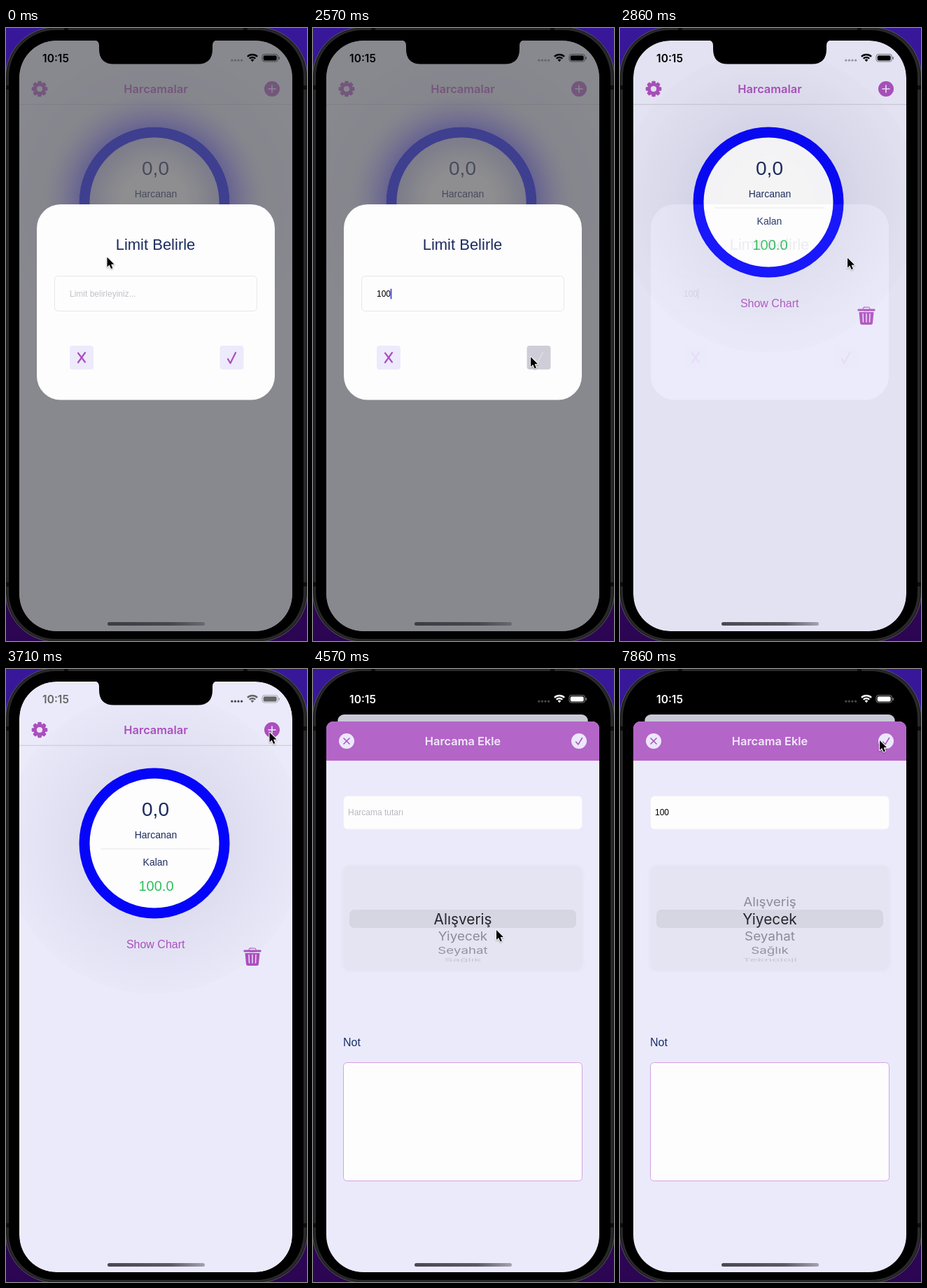
An HTML page with a canvas that plays this animation: 430 px wide and 876 px high, repeating every 8 s.

```html
<!DOCTYPE html>
<html lang="tr">
<head>
<meta charset="utf-8">
<title>Harcamalar</title>
<style>
html, body { margin: 0; width: 100%; height: 100%; overflow: hidden; background: #000; }
canvas { display: block; width: 430px; height: 876px; }
</style>
</head>
<body>
<canvas id="stage"></canvas>
<script>
const W = 430, H = 876, LOOP = 8000, FPS = 7;
const canvas = document.getElementById('stage');
const ratio = window.devicePixelRatio || 1;
canvas.width = W * ratio;
canvas.height = H * ratio;
const c = canvas.getContext('2d');

const SANS = '"Liberation Sans", Arial, sans-serif';
const UI = 'Inter, Roboto, sans-serif';
const PURPLE = '#ab4fbd', NAVY = '#1c2b5e', PAPER = '#fdfdfe', LILAC = '#ebeafb';
const SCREEN = { x: 19, y: 18, w: 390, h: 844 };

const clamp = v => Math.max(0, Math.min(1, v));
const mix = (a, b, p) => a + (b - a) * p;

// [step, x, y] of the pointer tip
const POINTER = [
  [0, 144.5, 327.5], [5, 165, 376], [13, 165, 376], [17, 311, 470], [18, 311, 470],
  [20, 325, 328.5], [24, 376.5, 90.5], [28, 376.5, 90.5], [32, 262, 373], [33, 262, 373],
  [36, 262, 350], [37, 262, 350], [42, 266, 216], [50, 266, 216], [55, 371, 102]
];

function pointerAt(n) {
  let i = 1;
  while (i < POINTER.length - 1 && POINTER[i][0] < n) i++;
  const [n0, x0, y0] = POINTER[i - 1], [n1, x1, y1] = POINTER[i];
  let p = clamp((n - n0) / (n1 - n0));
  p = p * p * (3 - 2 * p);
  return [mix(x0, x1, p), mix(y0, y1, p)];
}

function box(x, y, w, h, r, fill, stroke) {
  c.beginPath();
  c.roundRect(x, y, w, h, r);
  if (fill) { c.fillStyle = fill; c.fill(); }
  if (stroke) { c.strokeStyle = stroke; c.lineWidth = 1; c.stroke(); }
}

function disc(x, y, r, fill) {
  c.beginPath();
  c.arc(x, y, r, 0, Math.PI * 2);
  c.fillStyle = fill;
  c.fill();
}

function line(points, color, width) {
  c.beginPath();
  points.forEach(([x, y], i) => i ? c.lineTo(x, y) : c.moveTo(x, y));
  c.strokeStyle = color;
  c.lineWidth = width;
  c.lineCap = c.lineJoin = 'round';
  c.stroke();
}

function text(str, x, y, font, color, align = 'center') {
  c.font = font;
  c.fillStyle = color;
  c.textAlign = align;
  c.fillText(str, x, y);
}

function group(draw) {
  c.save();
  draw();
  c.restore();
}

function radial(x, y, r0, r1, from, to) {
  const g = c.createRadialGradient(x, y, r0, x, y, r1);
  g.addColorStop(0, from);
  g.addColorStop(1, to);
  return g;
}

function phone() {
  const g = c.createLinearGradient(0, 0, 0, H);
  g.addColorStop(0, '#38189a');
  g.addColorStop(0.5, '#2a1070');
  g.addColorStop(1, '#2c0552');
  c.fillStyle = g;
  c.fillRect(0, 0, W, H);
  box(-0.5, -1, 431, 878, 71, '#1c1c1e', '#57575b');
  box(1.5, 0.5, 427, 875, 69, '#29292b');
  c.fillStyle = '#0d0d0e';
  for (const y of [82, 792]) {
    c.fillRect(0, y, 5, 6);
    c.fillRect(425, y, 5, 6);
  }
  c.fillRect(83, 0, 6, 4);
  c.fillRect(339, 0, 6, 4);
  box(4, 3, 421, 870, 67, '#000');
}

function notch() {
  c.beginPath();
  c.moveTo(126, 17);
  c.quadraticCurveTo(133, 18, 133, 25);
  c.lineTo(133, 30);
  c.quadraticCurveTo(133, 51.5, 154, 51.5);
  c.lineTo(274, 51.5);
  c.quadraticCurveTo(295, 51.5, 295, 30);
  c.lineTo(295, 25);
  c.quadraticCurveTo(295, 18, 302, 17);
  c.closePath();
  c.fillStyle = '#000';
  c.fill();
}

function statusBar(level) {
  const v = Math.round(255 * level), ink = `rgb(${v},${v},${v})`;
  text('10:15', 71, 48.5, `600 15.5px ${UI}`, ink);
  const dots = level > 0.3 ? '#48484b' : 'rgba(60,58,70,.45)';
  for (let i = 0; i < 4; i++) disc(322.8 + i * 4.6, 46.2, 1.6, dots);
  const a = -Math.PI * 0.75, b = -Math.PI * 0.25;
  for (const r of [6, 10]) {
    c.beginPath();
    c.arc(352, 48, r, a, b);
    c.strokeStyle = ink;
    c.lineWidth = 2.4;
    c.lineCap = 'butt';
    c.stroke();
  }
  c.beginPath();
  c.moveTo(352, 48.3);
  c.arc(352, 48, 3.4, a, b);
  c.closePath();
  c.fillStyle = ink;
  c.fill();
  group(() => {
    c.globalAlpha = 0.5;
    box(366, 37.5, 22.5, 10.5, 3.3, null, ink);
    box(389.5, 41, 1.5, 4, 1, ink);
  });
  box(367.7, 39.2, 19, 7.2, 2, ink);
}

function homeBar(dim) {
  const g = c.createLinearGradient(145, 0, 284, 0);
  g.addColorStop(0, dim ? '#3e3c43' : '#4a4852');
  g.addColorStop(0.65, dim ? '#48464d' : '#5c5a64');
  g.addColorStop(1, dim ? '#6a6870' : '#a5a3b2');
  box(145, 849, 139, 5, 2.5, g);
}

function gear(x, y) {
  c.fillStyle = PURPLE;
  for (let i = 0; i < 8; i++) group(() => {
    c.translate(x, y);
    c.rotate(i * Math.PI / 4);
    c.beginPath();
    c.roundRect(-2.8, -11.3, 5.6, 6, 1.4);
    c.fill();
  });
  disc(x, y, 8.7, PURPLE);
  disc(x, y, 4.1, '#e8e6f7');
}

function trash() {
  box(347, 399, 10, 5, 2, null, PURPLE);
  box(339.5, 401.5, 25, 3, 1.2, PURPLE);
  c.beginPath();
  c.moveTo(341.5, 406);
  c.lineTo(362.5, 406);
  c.lineTo(361, 421.5);
  c.quadraticCurveTo(360.8, 424, 358, 424);
  c.lineTo(346, 424);
  c.quadraticCurveTo(343.2, 424, 343, 421.5);
  c.closePath();
  c.fillStyle = PURPLE;
  c.fill();
  for (const k of [-1, 0, 1]) line([[352 + k * 5, 408.5], [352 + k * 4.5, 420]], LILAC, 1.4);
}

function home() {
  c.fillStyle = LILAC;
  c.fillRect(SCREEN.x, SCREEN.y, SCREEN.w, SCREEN.h);
  disc(212, 249, 215, radial(212, 249, 107, 215, 'rgba(50,55,85,.07)', 'rgba(50,55,85,.01)'));
  c.fillStyle = '#c8c6d1';
  c.fillRect(19, 108.7, 390, 1);
  gear(48, 87);
  text('Harcamalar', 214, 93, `600 16.4px ${UI}`, PURPLE);
  disc(380, 87, 11, PURPLE);
  line([[375, 87], [385, 87]], LILAC, 1.6);
  line([[380, 82], [380, 92]], LILAC, 1.6);

  disc(212, 249, 107.5, '#0505fa');
  disc(212, 249, 92.5, PAPER);
  c.fillStyle = '#e6e6ea';
  c.fillRect(135, 256.5, 157, 1);
  text('0,0', 213.5, 210, `28px ${SANS}`, NAVY);
  text('Harcanan', 214, 242, `14px ${SANS}`, NAVY);
  text('Kalan', 213.5, 281, `14px ${SANS}`, NAVY);
  text('100.0', 214.5, 316.5, `20px ${SANS}`, '#2fc05a');
  text('Show Chart', 213.7, 398.5, `16px ${SANS}`, PURPLE);
  trash();
}

function dialog(n) {
  // blue halo seen through the veil
  c.fillStyle = 'rgba(91,90,93,.68)';
  c.fillRect(SCREEN.x, SCREEN.y, SCREEN.w, SCREEN.h);
  c.beginPath();
  c.arc(212, 249, 155, 0, Math.PI * 2);
  c.arc(212, 249, 107.5, 0, Math.PI * 2, true);
  c.fillStyle = radial(212, 249, 107, 155, 'rgba(84,78,150,.6)', 'rgba(110,106,146,0)');
  c.fill();
  disc(212, 249, 92.5, radial(212, 249, 45, 92.5, 'rgba(100,100,125,0)', 'rgba(96,96,132,.4)'));

  box(44, 252, 340, 279.5, 34, PAPER);
  text('Limit Belirle', 213.5, 317, `22px ${SANS}`, NAVY);
  box(69.5, 354.5, 289, 50, 5, PAPER, '#e7e7ea');
  const value = typed(n, 7, 1);
  if (value) text(value, 91, 384, `12px ${SANS}`, '#000', 'left');
  else text('Limit belirleyiniz...', 91, 384, `12px ${SANS}`, '#c3c3c9', 'left');
  if (n >= 5 && n !== 11) caret(91, 372.5, value);

  const pressed = n >= 18 && n < 20;
  box(91, 454, 34, 34, 4, '#eceafb');
  line([[103, 464.5], [113, 477.5]], PURPLE, 2.2);
  line([[113, 464], [103, 478]], PURPLE, 2.2);
  box(305.5, 454, 34, 34, 4, pressed ? '#cfcdd7' : '#eceafb');
  line([[317, 473], [320.5, 479], [328, 464]], pressed ? '#dcd8e6' : PURPLE, 2.2);
}

function typed(n, start, gap) {
  return '100'.slice(0, Math.max(0, Math.floor((n - start) / gap) + 1));
}

function caret(x, y, value) {
  c.font = `12px ${SANS}`;
  box(x + c.measureText(value).width - 0.5, y, 2, 15, 1, '#4a55e0');
}

const ROWS = ['Alışveriş', 'Yiyecek', 'Seyahat', 'Sağlık', 'Teknoloji'];

function picker(pos) {
  group(() => {
    c.shadowColor = 'rgba(222,220,238,.9)';
    c.shadowBlur = 6 * ratio;
    box(44, 207, 340, 148, 8, '#e5e4f3');
  });
  box(52, 269, 324, 26, 7, '#d6d5e2');
  const mid = 282, band = 13, radius = 62, step = 0.406;

  group(() => {
    c.beginPath();
    c.rect(43, 206, 342, 269 - 206);
    c.rect(43, 295, 342, 344 - 295);
    c.clip();
    ROWS.forEach((name, i) => {
      const d = i - pos, turn = d * step;
      if (Math.abs(d) > 3.2) return;
      group(() => {
        c.translate(214, mid + radius * Math.sin(turn));
        c.scale(0.96 + 0.04 * Math.cos(turn), Math.cos(turn));
        const a = 0.47 * (1 - Math.pow(Math.abs(d) / 3.25, 5));
        text(name, 0, 7, `19px ${UI}`, `rgba(40,38,50,${a})`);
      });
    });
  });

  group(() => {
    c.beginPath();
    c.rect(52, mid - band, 324, band * 2);
    c.clip();
    ROWS.forEach((name, i) => {
      const y = mid + (i - pos) * 26;
      if (Math.abs(y - mid) < 40) text(name, 214, y + 7.8, `20.8px ${UI}`, '#26252b');
    });
  });
}

function sheet(n, top) {
  c.translate(0, top);
  box(19, 0, 390, 900, [10, 10, 0, 0], LILAC);
  box(19, 0, 390, 56, [10, 10, 0, 0], '#b465c8');
  text('Harcama Ekle', 214, 34, `600 16.4px ${UI}`, '#f1e8fa');
  disc(48, 28, 11, '#ece8fb');
  disc(380, 28, 11, '#ece8fb');
  line([[44, 24], [52, 32]], '#a956bf', 1.6);
  line([[52, 24], [44, 32]], '#a956bf', 1.6);
  line([[375.7, 29.2], [378.8, 32.8], [384.6, 23.5]], '#a956bf', 1.6);

  box(43.5, 106.5, 341, 47.5, 6, PAPER, '#f0eff7');
  const value = typed(n, 46, 2);
  if (value) text(value, 50, 134, `12px ${SANS}`, '#000', 'left');
  else text('Harcama tutarı', 50, 134, `12px ${SANS}`, '#b9b9be', 'left');
  if (n >= 44 && n < 54) caret(50, 122.5, value);

  const p = clamp((n - 33) / 5);
  picker(p * p * (3 - 2 * p));
  text('Not', 43, 464, `16px ${SANS}`, '#16306a', 'left');
  box(43.5, 487.5, 341, 169, 5, PAPER, '#d5a2e0');
}

function pointer(n) {
  const [x, y] = pointerAt(n);
  group(() => {
    c.translate(x, y);
    c.beginPath();
    c.moveTo(0, 0);
    c.lineTo(0, 14);
    c.lineTo(3.2, 11);
    c.lineTo(5.6, 16.4);
    c.lineTo(7.9, 15.4);
    c.lineTo(5.6, 10.2);
    c.lineTo(10, 10);
    c.closePath();
    c.shadowColor = 'rgba(0,0,0,.3)';
    c.shadowBlur = 2 * ratio;
    c.shadowOffsetY = ratio;
    c.lineJoin = 'round';
    c.lineWidth = 2;
    c.strokeStyle = '#fff';
    c.stroke();
    c.shadowColor = 'transparent';
    c.fillStyle = '#000';
    c.fill();
  });
}

function render(n) {
  c.setTransform(ratio, 0, 0, ratio, 0, 0);
  phone();

  const veil = n < 19 ? 1 : n < 20 ? 0.5 : n < 21 ? 0.08 : 0;
  // critically damped spring
  const wt = 18.26 * Math.max(0, n - 26) / FPS;
  const left = (1 + wt) * Math.exp(-wt), shown = 1 - left;

  group(() => {
    c.beginPath();
    c.roundRect(SCREEN.x, SCREEN.y, SCREEN.w, SCREEN.h, 53);
    c.clip();
    c.fillStyle = '#000';
    c.fillRect(0, 0, W, H);

    group(() => {
      const scale = 1 - 0.083 * shown;
      c.translate(214, mix(18, 65, shown));
      c.scale(scale, scale);
      c.translate(-214, -18);
      c.beginPath();
      c.roundRect(SCREEN.x, SCREEN.y, SCREEN.w, SCREEN.h, mix(53, 10, shown));
      c.clip();
      home();
      if (shown > 0) {
        c.fillStyle = `rgba(0,0,0,${0.145 * shown})`;
        c.fillRect(0, 0, W, H);
      }
    });

    if (veil === 1) dialog(n);
    else if (veil > 0) fade(() => dialog(n), veil);
    if (shown > 0) group(() => sheet(n, 75 + 787 * left));
    homeBar(veil > 0.4);
  });

  notch();
  statusBar(clamp((n - 24) / 5));
  pointer(n);
}

// blends a drawing as one layer over what is already there
const under = document.createElement('canvas');
under.width = canvas.width;
under.height = canvas.height;
function fade(draw, alpha) {
  const u = under.getContext('2d');
  u.clearRect(0, 0, under.width, under.height);
  u.drawImage(canvas, 0, 0);
  draw();
  group(() => {
    c.setTransform(1, 0, 0, 1, 0, 0);
    c.globalAlpha = 1 - alpha;
    c.drawImage(under, 0, 0);
  });
}

const began = performance.now();
function tick() {
  const t = (performance.now() - began) % LOOP;
  render(Math.floor((t + 5) * FPS / 1000) % (LOOP * FPS / 1000));
  requestAnimationFrame(tick);
}
tick();
</script>
</body>
</html>
```
